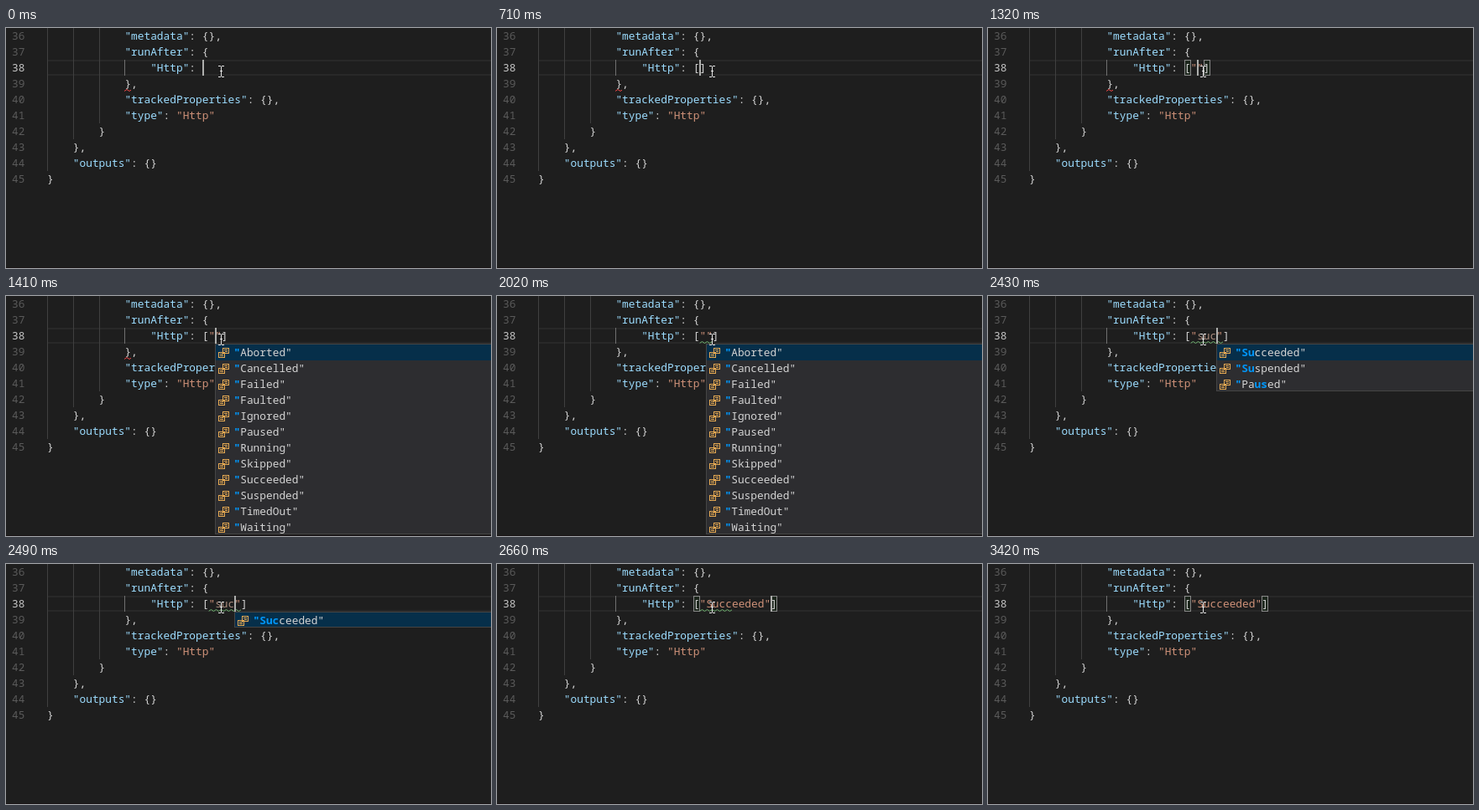
Write an HTML page with a canvas that moves like this. It is 578 by 287 pixels and loops after 3590 ms.

```html
<!DOCTYPE html>
<html lang="en">
<head>
<meta charset="utf-8">
<title>Editor completion</title>
<style>
  html, body { margin: 0; width: 100%; height: 100%; overflow: hidden; background: #1e1e1e; }
  canvas { display: block; width: 578px; height: 287px; }
</style>
</head>
<body>
<canvas id="stage" width="578" height="287"></canvas>
<script>
const ctx = document.getElementById('stage').getContext('2d');
const LOOP = 3590, ROW = 19, CELL = 7.698, LEFT = 49, FIRST = 36, ACTIVE = 38;
const FACE = '12.83px "Noto Sans Mono", "DejaVu Sans Mono", monospace';
const C = {
  bg: '#1e1e1e', text: '#d4d4d4', key: '#9cdcfe', str: '#ce9178', draft: '#a98b7d',
  number: '#5a5a5a', active: '#c6c6c6', guide: '#404040', guideOn: '#707070',
  line: '#282828', caret: '#aeafad', box: '#888888', error: '#ea4646', warn: '#71b771',
  list: '#2d2d30', border: '#454545', pick: '#062f4a', match: '#0097fb', icon: '#e8ab53'
};

// indent depth, key, punctuation, value
const code = [
  [3, '"metadata"', ': {},'],
  [3, '"runAfter"', ': {'],
  [4, '"Http"', ': '],
  [3, '', '},'],
  [3, '"trackedProperties"', ': {},'],
  [3, '"type"', ': ', '"Http"'],
  [2, '', '}'],
  [1, '', '},'],
  [1, '"outputs"', ': {}'],
  [0, '', '}']
];

const statuses = ['Aborted', 'Cancelled', 'Failed', 'Faulted', 'Ignored', 'Paused',
  'Running', 'Skipped', 'Succeeded', 'Suspended', 'TimedOut', 'Waiting'];
const S = statuses.slice(7, 10).concat('Paused');
const SU = S.slice(1);

// text: typed value, at: caret offset, box: bracket match, list: completions, query: matched letters
const steps = [
  { t: 0, text: '', at: 0, caret: 1 },
  { t: 230, caret: 0 },
  { t: 710, text: '[]', at: 1, caret: 1 },
  { t: 780, box: 1 },
  { t: 1240, text: '[""]', at: 2, plain: 1 },
  { t: 1320, plain: 0 },
  { t: 1410, box: 0, list: statuses, query: '' },
  { t: 1870, caret: 0 },
  { t: 2020, wave: 2 },
  { t: 2190, text: '["s"]', at: 3, caret: 1, wave: 3, list: S, query: 's' },
  { t: 2260, text: '["su"]', at: 4, wave: 4, list: SU, query: 'su' },
  { t: 2430, text: '["suc"]', at: 5, wave: 5 },
  { t: 2490, list: ['Succeeded'], query: 'suc' },
  { t: 2590, text: '["Succeeded"]', at: 12, list: null },
  { t: 2660, box: 1 },
  { t: 3040, caret: 0 },
  { t: 3420, wave: 0 }
];

const stateAt = t => Object.assign({}, ...steps.filter(s => s.t <= t));
const colX = n => LEFT + n * CELL;
const VALUE = 24, TOP = (ACTIVE - FIRST) * ROW;

function rect(color, x, y, w, h) {
  ctx.fillStyle = color;
  ctx.fillRect(x, y, w, h);
}

function frame(color, x, y, w, h) {
  ctx.strokeStyle = color;
  ctx.lineWidth = 1;
  ctx.strokeRect(x + 0.5, y + 0.5, w - 1, h - 1);
}

function write(text, x, base, color, bold) {
  ctx.font = (bold ? 'bold ' : '') + FACE;
  ctx.fillStyle = color;
  ctx.fillText(text, x, base);
  return x + text.length * CELL;
}

function squiggle(color, x, y, w) {
  ctx.save();
  ctx.beginPath();
  ctx.rect(x, y, w, 3);
  ctx.clip();
  ctx.beginPath();
  for (let i = 0; i * 3 <= w + 3; i++) ctx.lineTo(x + i * 3, y + (i % 2 ? 0.5 : 2.5));
  ctx.strokeStyle = color;
  ctx.lineWidth = 1;
  ctx.stroke();
  ctx.restore();
}

function drawGuides() {
  [9, 7, 6].forEach((rows, i) => rect(C.guide, Math.round(colX(i * 4)), 0, 1, rows * ROW));
  rect(C.guideOn, Math.round(colX(12)), TOP, 1, ROW);
}

function drawCode() {
  code.forEach(([depth, key, mark, value = ''], i) => {
    const n = FIRST + i, base = i * ROW + 14;
    write(String(n), 7, base, n === ACTIVE ? C.active : C.number);
    let x = write(key, colX(depth * 4), base, C.key);
    x = write(mark, x, base, C.text);
    write(value, x, base, C.str);
  });
}

function drawValue(s) {
  [...s.text].forEach((ch, i) => {
    const bracket = ch === '[' || ch === ']';
    const draft = s.list && /[a-z]/.test(ch);
    const color = bracket || s.plain ? C.text : draft ? C.draft : C.str;
    write(ch, colX(VALUE + i), TOP + 14, color);
  });
}

function drawBox(col) {
  const x = Math.round(colX(col));
  rect('rgba(0,100,0,0.1)', x, TOP, 8, ROW);
  frame(C.box, x, TOP, 8, ROW);
}

function drawIcon(x, y) {
  frame(C.icon, x + 5, y, 8, 7);
  rect(C.icon, x + 7, y + 2, 4, 1);
  rect(C.icon, x + 8, y + 4, 3, 1);
  frame(C.icon, x, y + 5, 8, 7);
  rect(C.icon, x + 2, y + 7, 4, 1);
  rect(C.icon, x + 2, y + 9, 4, 1);
}

// Start of the matched letters; swapped neighbours also count.
function matchStart(word, query) {
  const w = word.toLowerCase(), i = w.indexOf(query);
  return i >= 0 ? i : w.indexOf([...query].reverse().join(''));
}

function drawItem(word, query, x, base) {
  const a = matchStart(word, query), b = a + query.length;
  x = write('"', x, base, C.match, true);
  x = write(word.slice(0, a), x, base, C.text);
  x = write(word.slice(a, b), x, base, C.match, true);
  write(word.slice(b) + '"', x, base, C.text);
}

function drawList(s) {
  const x = Math.round(colX(VALUE + s.at)), y = TOP + ROW, h = s.list.length * ROW;
  ctx.save();
  ctx.beginPath();
  ctx.rect(x, y, 430, h);
  ctx.clip();
  rect(C.list, x, y, 430, h);
  rect(C.pick, x + 1, y + 1, 428, ROW);
  s.list.forEach((word, i) => {
    const top = y + 1 + i * ROW;
    drawIcon(x + 4, top + 4);
    drawItem(word, s.query, x + 22.5, top + 14);
  });
  frame(C.border, x, y, 430, h);
  ctx.restore();
}

function drawPointer() {
  const c = '#e6e6e6';
  rect(c, 256, 46, 1, 12);
  for (const y of [45, 58]) {
    rect(c, 253, y, 3, 1);
    rect(c, 257, y, 3, 1);
  }
  rect(c, 255, 51, 3, 1);
}

function draw(t) {
  const s = stateAt(t);
  rect(C.bg, 0, 0, 578, 287);
  rect('#191315', 0, 286, 578, 1);
  rect(C.line, LEFT, TOP, 529, 2);
  rect(C.line, LEFT, TOP + ROW - 2, 529, 2);
  drawGuides();
  if (s.box) {
    drawBox(VALUE);
    drawBox(VALUE + s.text.length - 1);
  }
  drawCode();
  drawValue(s);
  if (t < 2020) squiggle(C.error, 141, 73, 8);
  if (s.wave) squiggle(C.warn, colX(VALUE + 1), 54, s.wave * CELL);
  if (s.caret) rect(C.caret, Math.round(colX(VALUE + s.at)), TOP, 2, ROW);
  if (s.list) drawList(s);
  drawPointer();
}

const start = performance.now();
function tick() {
  draw((performance.now() - start) % LOOP);
  requestAnimationFrame(tick);
}
tick();
</script>
</body>
</html>
```
